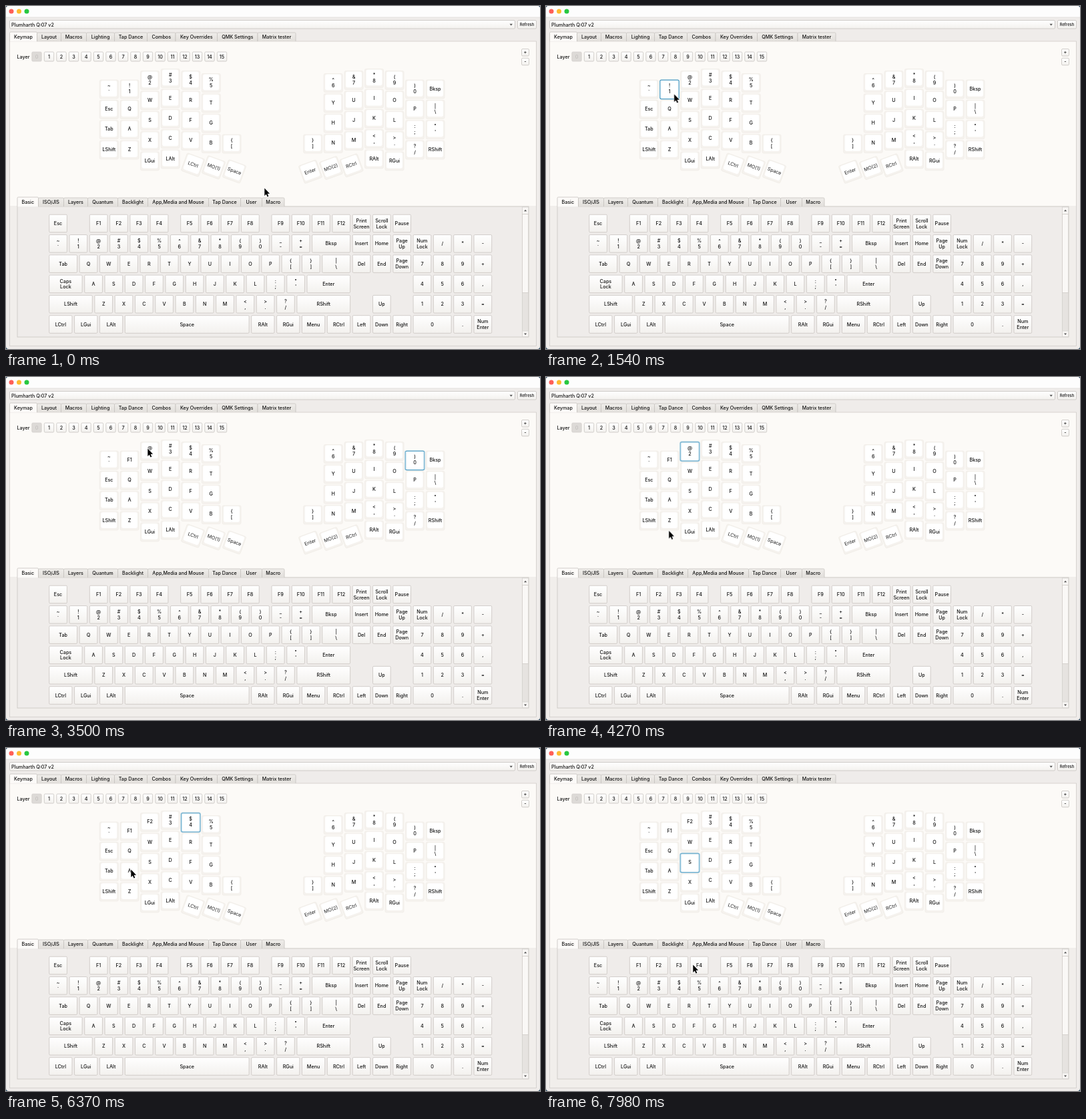
An HTML page for the animation above (8000 ms loop, 800 by 515 pixels).

```html
<!DOCTYPE html>
<html lang="en">
<head>
<meta charset="utf-8">
<title>Keymap editor</title>
<style>
html, body { margin: 0; width: 100%; height: 100%; overflow: hidden; background: #efecea; }
svg { display: block; width: 800px; height: 515px; }
text { font: 500 7.2px Inter, "Open Sans", sans-serif; fill: #111; }
.mid { text-anchor: middle; }
.tilted text { font-weight: 400; fill: #222; }
.loop { animation: 8s step-end infinite; }

#pointer { animation: move 8s ease-in-out infinite; }
#ripple { animation: ripple 8s linear infinite; }

@keyframes move {
  0%, .9% { transform: translate(387px, 273px); }
  12%, 18.75% { transform: translate(192px, 131px); }
  28.75%, 37.5% { transform: translate(141px, 322px); }
  43.5%, 48.2% { transform: translate(212px, 107px); }
  57.75%, 70.9% { transform: translate(163px, 322px); }
  79.6%, 85.75% { transform: translate(187px, 182px); }
  92.5%, 96% { transform: translate(208px, 171px); }
  99.75%, 100% { transform: translate(220px, 325px); }
}
@keyframes ripple {
  0%, 14.8%, 17.6%, 32.3%, 36.2%, 45.4%, 48.2%, 60.3%, 64.8%, 94.4%, 97%, 100% { opacity: 0; }
  15.3%, 16.4%, 32.8%, 35%, 46%, 47.2%, 60.8%, 63.8%, 94.9%, 96% { opacity: 1; }
}

/* Focus frames */
@keyframes focus-1 { 0% { opacity: 0; } 15.75% { opacity: 1; } 36.75%, 100% { opacity: 0; } }
@keyframes focus-0 { 0% { opacity: 0; } 36.75% { opacity: 1; } 46.5%, 100% { opacity: 0; } }
@keyframes focus-2 { 0% { opacity: 0; } 46.5% { opacity: 1; } 63%, 100% { opacity: 0; } }
@keyframes focus-4 { 0% { opacity: 0; } 63% { opacity: 1; } 95.4%, 100% { opacity: 0; } }
@keyframes focus-S { 0% { opacity: 0; } 95.4%, 100% { opacity: 1; } }

/* Reassigned labels */
@keyframes old-1 { 0% { opacity: 1; } 36.75%, 100% { opacity: 0; } }
@keyframes new-1 { 0% { opacity: 0; } 36.75%, 100% { opacity: 1; } }
@keyframes old-2 { 0% { opacity: 1; } 63%, 100% { opacity: 0; } }
@keyframes new-2 { 0% { opacity: 0; } 63%, 100% { opacity: 1; } }
</style>
</head>
<body>
<svg viewBox="0 0 800 515" xmlns="http://www.w3.org/2000/svg">
  <defs>
    <linearGradient id="face" x2="0" y2="1">
      <stop stop-color="#fff"/><stop offset="1" stop-color="#f3f1ee"/>
    </linearGradient>
    <linearGradient id="idle" x2="0" y2="1">
      <stop stop-color="#efedea"/><stop offset="1" stop-color="#e2dfdb"/>
    </linearGradient>
  </defs>
  <rect width="800" height="515" fill="#24455f"/>
  <rect width="800" height="515" rx="4" fill="#efecea"/>
  <path d="M0 17V4Q0 0 4 0H796Q800 0 800 4V17Z" fill="#fdfdfd"/>
  <path d="M0 17H800" stroke="#dedbd8" stroke-width=".8"/>
  <g id="ui"></g>
  <g id="pointer">
    <circle id="ripple" cx=".5" cy="1" r="18.5" fill="#fff" fill-opacity=".4" stroke="#aaa" stroke-opacity=".45" stroke-width=".8"/>
    <path d="M.3 .6V11.9L2.8 9.5L4.6 13.5L6.3 12.7L4.6 8.8H8.1Z" fill="#000" stroke="#fff" stroke-width="1.2" paint-order="stroke"/>
  </g>
</svg>
<script>
const ui = document.getElementById('ui');

function add(tag, attrs, parent = ui) {
  const node = document.createElementNS('http://www.w3.org/2000/svg', tag);
  for (const name in attrs) node.setAttribute(name, attrs[name]);
  return parent.appendChild(node);
}

function box(x, y, width, height, fill, stroke = '#c6c2be', parent = ui, rx = 1.5) {
  return add('rect', { x, y, width, height, rx, fill, stroke, 'stroke-width': .8 }, parent);
}

function write(string, x, y, parent = ui, cls = 'mid') {
  const node = add('text', { x, y: y + 2.6, class: cls }, parent);
  node.textContent = string;
  return node;
}

// "¦" separates the two lines of a key label
function label(string, x, y, parent = ui) {
  const group = add('g', {}, parent);
  const lines = string.split('¦');
  lines.forEach((line, i) => write(line, x, y + (i - (lines.length - 1) / 2) * 8.8, group));
  return group;
}

function loop(node, name) {
  node.classList.add('loop');
  node.style.animationName = name;
}

function button(string, x, y, width, height) {
  box(x, y, width, height, 'url(#face)');
  return write(string, x + width / 2, y + height / 2);
}

function tabs(names, edges, top, base) {
  names.forEach((name, i) => {
    const x = edges[i], width = edges[i + 1] - x, on = i === 0;
    const y = on ? top : top + 1;
    add('path', {
      d: `M${x} ${base}V${y + 1.5}q0 -1.5 1.5 -1.5h${width - 3}q1.5 0 1.5 1.5V${base}`,
      fill: on ? '#fcfaf8' : 'url(#idle)', stroke: '#c6c2be', 'stroke-width': .8
    });
    write(name, x + width / 2, (y + base) / 2 + (on ? .2 : -.2));
  });
}

// Title bar and device row
['#ff5f57', '#febc2e', '#28c840'].forEach((fill, i) => add('circle', { cx: 8 + i * 11.5, cy: 8, r: 3.5, fill }));
box(5.5, 21.5, 757, 12.5, 'url(#face)');
write('Plumharth Q:07 v2', 8, 28, ui, '');
add('path', { d: 'M754.5 26.8h4.4l-2.2 2.8z', fill: '#555' });
button('Refresh', 766.5, 21.5, 28, 12.5).style.fontSize = '5.8px';

// Main pane
box(5.5, 53, 789, 457.5, '#fcfaf7', '#cfcbc7', ui, 0);
tabs(['Keymap', 'Layout', 'Macros', 'Lighting', 'Tap Dance', 'Combos', 'Key Overrides', 'QMK Settings', 'Matrix tester'],
  [5.5, 46.5, 82.5, 120.5, 162.5, 211.5, 254, 316.5, 377, 434], 39, 53);
add('path', { d: 'M6 53H46', stroke: '#fcfaf8', 'stroke-width': 1.2 });
add('rect', { x: 6, y: 300, width: 788, height: 210, fill: '#f1eeeb' });

// Layer picker
write('Layer', 16.5, 76, ui, '');
for (let n = 0; n < 16; n++) {
  const x = 46 + n * 18.5;
  box(x - 7.2, 69, 14.4, 14, n ? 'url(#face)' : '#dddad7', n ? '#c6c2be' : '#d3d0cd');
  const digit = write(n, x, 76);
  if (!n) digit.style.fill = '#c4c1be';
}
button('+', 772.5, 64.5, 11, 10.5);
button('-', 772.5, 78.3, 11, 10.5);

// Split keyboard
function cap(string, x, y, angle = 0) {
  const group = add('g', { transform: `translate(${x} ${y}) rotate(${angle})` });
  if (angle) group.classList.add('tilted');
  box(-14, -14, 28, 28, '#f5f2ee', '#f0ece7', group, 2);
  box(-11.6, -12.6, 23.2, 23, '#fff', '#fff', group, 2);
  const last = string.split('¦').pop();
  if ('1024S'.includes(last)) {
    const frame = box(-14.2, -13.8, 28.4, 28.4, '#fff', '#4398c2', group, 2);
    frame.setAttribute('stroke-width', 1.2);
    loop(frame, 'focus-' + last);
  }
  const text = label(string, 0, -.9, group);
  if (last === '1' || last === '2') {
    loop(text, 'old-' + last);
    loop(label('F' + last, 0, -.9, group), 'new-' + last);
  }
}

[
  [154.3, 125, '~¦` Esc Tab LShift'],
  [185, 125, '!¦1 Q A Z'],
  [215.5, 111.5, '@¦2 W S X LGui'],
  [246.2, 108.5, '#¦3 E D C LAlt'],
  [276.7, 111.5, '$¦4 R F V'],
  [307.2, 115.5, '%¦5 T G B'],
  [338, 207, '{¦['],
  [459.7, 207, '}¦]'],
  [490.2, 115.5, '^¦6 Y H N'],
  [521, 111.5, '&¦7 U J M'],
  [551.5, 108.5, '*¦8 I K <¦, RAlt'],
  [582, 111.5, '(¦9 O L >¦. RGui'],
  [612.5, 125, ')¦0 P :¦; ?¦/'],
  [643, 125, 'Bksp |¦\\ "¦\' RShift']
].forEach(([x, y, column]) => column.split(' ').forEach((key, i) => cap(key, x, y + i * 30.35)));

[
  ['LCtrl', 280, 238.6], ['MO(1)', 311, 242.4], ['Space', 342, 248.4]
].forEach(([key, x, y]) => cap(key, x, y, 20));
[
  ['Enter', 456, 248.8], ['MO(2)', 487, 243.2], ['RCtrl', 517.5, 239.4]
].forEach(([key, x, y]) => cap(key, x, y, -20));

// Key palette
box(17, 301, 766, 196, '#efecea', '#c9c5c1', ui, 0);
tabs(['Basic', 'ISO/JIS', 'Layers', 'Quantum', 'Backlight', 'App,Media and Mouse', 'Tap Dance', 'User', 'Macro'],
  [17, 48.5, 86.5, 122.5, 167.5, 212.5, 303.5, 351.5, 383.5, 417], 287, 301);
add('path', { d: 'M17.5 301H48', stroke: '#fcfaf8', 'stroke-width': 1.2 });

box(773.5, 301.5, 9.2, 195, '#e6e3e0', '#d2cfcb', ui, 0);
box(773.5, 302, 9.2, 10.5, '#f8f6f4', '#d8d5d2', ui, 0);
box(773.5, 312.5, 9.2, 118, '#faf8f6', '#d0ccc8', ui, 0);
box(773.5, 488, 9.2, 8.5, '#f8f6f4', '#d8d5d2', ui, 0);
add('path', { d: 'M776 308.3h4.2l-2.1 -2.6zM776 491.4h4.2l-2.1 2.6z', fill: '#555' });

// "×" gives a width in key units, a bare "_" is a gap
const unit = 30.3;
[
  'Esc _ F1 F2 F3 F4 _×.5 F5 F6 F7 F8 _×.5 F9 F10 F11 F12 Print¦Screen Scroll¦Lock Pause',
  '~¦` !¦1 @¦2 #¦3 $¦4 %¦5 ^¦6 &¦7 *¦8 (¦9 )¦0 _¦- +¦= Bksp×2 Insert Home Page¦Up Num¦Lock / * -',
  'Tab×1.5 Q W E R T Y U I O P {¦[ }¦] |¦\\×1.5 Del End Page¦Down 7 8 9 +',
  'Caps¦Lock×1.75 A S D F G H J K L :¦; "¦\' Enter×2.25 _×3 4 5 6 ,',
  'LShift×2.25 Z X C V B N M <¦, >¦. ?¦/ RShift×2.75 _ Up _ 1 2 3 =',
  'LCtrl×1.25 LGui×1.25 LAlt×1.25 Space×6.25 RAlt×1.25 RGui×1.25 Menu×1.25 RCtrl×1.25 Left Down Right 0×2 . Num¦Enter'
].forEach((row, r) => {
  let x = 64.7;
  const y = 313.2 + r * unit;
  for (const token of row.split(' ')) {
    const [key, span = 1] = token.split('×');
    const width = span * unit - 3.6;
    if (key !== '_') {
      box(x, y, width, 26.6, 'url(#face)', '#c9c5c1');
      label(key, x + width / 2, y + 13.3);
    }
    x += span * unit;
  }
});
</script>
</body>
</html>
```
